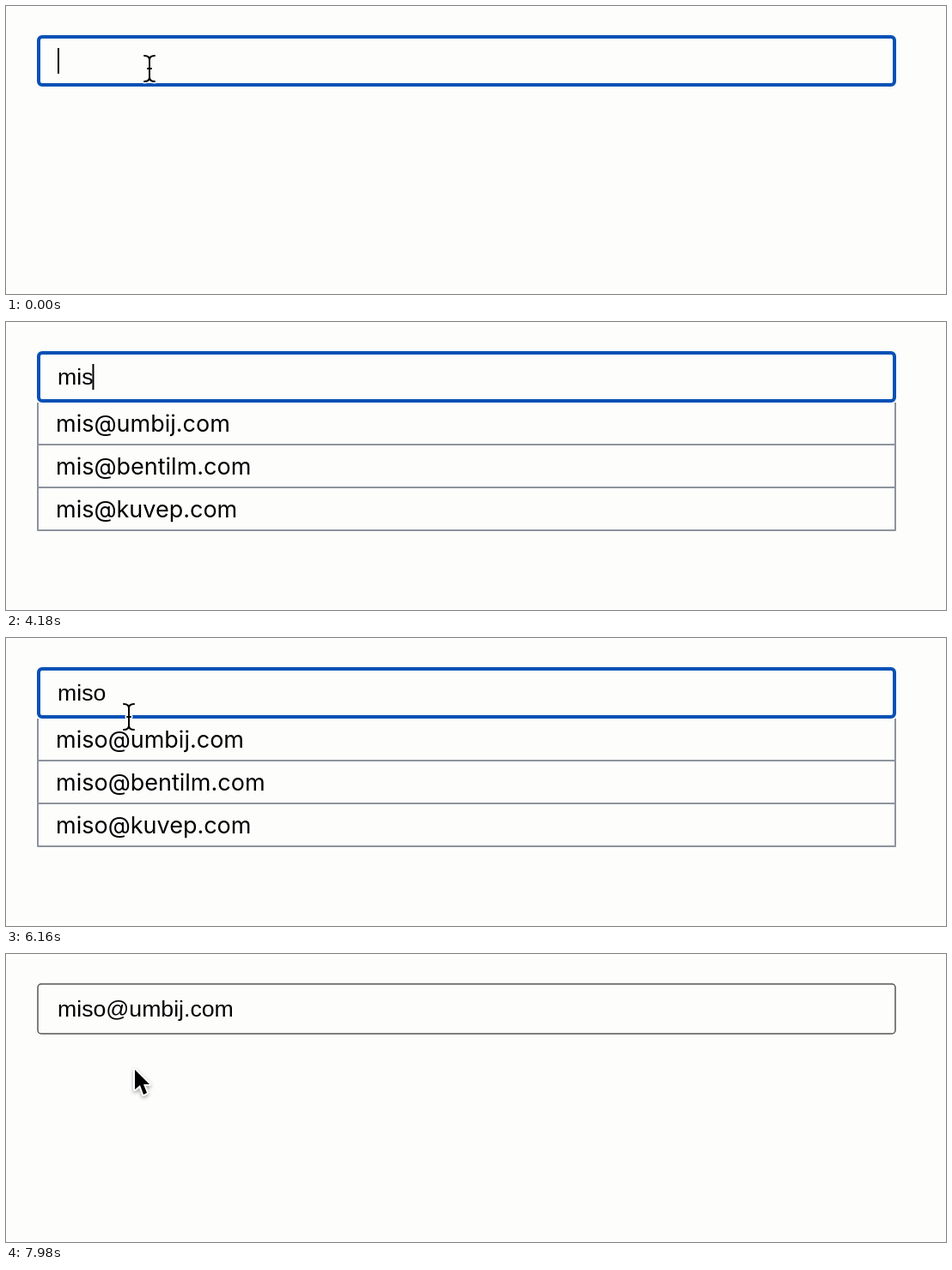
Write an HTML page that moves like this. It is 1094 by 336 pixels and loops after 8 s.

```html
<!DOCTYPE html>
<html lang="en">
<head>
<meta charset="utf-8">
<title>Email suggestions</title>
<style>
  html, body { margin: 0; width: 100%; height: 100%; overflow: hidden; background: #fdfdfc; }
  svg { display: block; width: 1094px; height: 336px; }
  path { stroke-linecap: round; stroke-linejoin: round; }
  #value { font: 26.667px "Liberation Sans", Arial, sans-serif; }
  #list text { font: 27px Inter, sans-serif; }
  #list path { fill: none; stroke: #8e939d; stroke-width: 2; stroke-linecap: butt; }
  #beam path { fill: none; stroke: #000; stroke-width: 2; }
  #beam path.halo { stroke: #fff; stroke-width: 5; }
  #hand, #arrow { filter: drop-shadow(0 2px 2px #0005); }
</style>
</head>
<body>
<svg viewBox="0 0 1094 336">
  <g id="list">
    <rect id="hover" x="38" y="94" width="996" height="48" fill="#ececee"/>
    <path d="M37 94V243H1035V94M37 143H1035M37 193H1035"/>
    <text x="58" y="128"></text>
    <text x="58" y="178"></text>
    <text x="58" y="228"></text>
  </g>
  <rect id="box" fill="none"/>
  <text id="value" x="60" y="73"></text>
  <rect id="caret" y="49" width="2" height="30"/>

  <!-- Pointers, each with its hot spot at 0,0 -->
  <g id="beam">
    <path class="halo" d="M-6-15Q0-15 0-10Q0-15 6-15M0-10V10M-6 15Q0 15 0 10Q0 15 6 15M-2 0H2"/>
    <path d="M-6-15Q0-15 0-10Q0-15 6-15M0-10V10M-6 15Q0 15 0 10Q0 15 6 15M-2 0H2"/>
  </g>
  <g id="hand" stroke="#000" stroke-width="2">
    <path fill="#fff" d="M-4 3Q-4 0-1 0Q1 0 2 3L5 10Q8 7 10 11Q13 9 15 12Q19 11 20 16V22Q19 27 17 32H4Q3 29-1 25L-8 18Q-9 14-6 13Q-3 13 0 16Z"/>
    <path fill="none" d="M7 18L8 25M11 18L12 25M15 18V25"/>
  </g>
  <g id="arrow">
    <path fill="#000" stroke="#fff" stroke-width="4" paint-order="stroke" d="M0 2V25L6 20L10 31L14 29L10 19H17Z"/>
  </g>
</svg>
<script>
const $ = id => document.getElementById(id);
const LOOP = 8000, CLICK = 7500, HOVER = 6430;
const user = 'miso';
const hosts = ['umbij.com', 'bentilm.com', 'kuvep.com'];
const keyTimes = [2660, 3340, 3980, 4500];
const rows = document.querySelectorAll('#list text');

const show = (id, on) => $(id).style.display = on ? '' : 'none';
const set = (el, attrs) => {
  for (const name in attrs) el.setAttribute(name, attrs[name]);
};

// Eased point on the way from a to b between two times
function glide(t, start, end, a, b) {
  const k = Math.min(1, Math.max(0, (t - start) / (end - start)));
  const e = k * k * (3 - 2 * k);
  return a.map((v, i) => v + (b[i] - v) * e);
}

function place(id, [x, y]) {
  $(id).setAttribute('transform', `translate(${x} ${y})`);
}

function draw(t) {
  const done = t >= CLICK;
  const typed = user.slice(0, keyTimes.filter(k => t >= k).length);

  $('value').textContent = done ? `${user}@${hosts[0]}` : typed;
  rows.forEach((row, i) => row.textContent = `${typed}@${hosts[i]}`);
  show('list', typed && !done);
  show('hover', t >= HOVER);

  set($('box'), done
    ? { x: 37, y: 35, width: 998, height: 58, rx: 4, stroke: '#555', 'stroke-width': 1.5 }
    : { x: 38, y: 36, width: 996, height: 56, rx: 4, stroke: '#0751b5', 'stroke-width': 4 });

  show('caret', t < 1380 || (t >= keyTimes[0] && t < 6150));
  $('caret').setAttribute('x', typed ? 59 + $('value').getComputedTextLength() : 60);

  show('beam', t < keyTimes[0] || (t >= 5300 && t < HOVER));
  show('hand', t >= HOVER && !done);
  show('arrow', done);
  place('beam', glide(t, 5300, 5850, [167, 73], [143, 92]));
  place('hand', glide(t, HOVER, 6700, [143, 96], [150, 138]));
  place('arrow', [150, 133]);
}

function tick() {
  draw(performance.now() % LOOP);
  requestAnimationFrame(tick);
}
tick();
</script>
</body>
</html>
```
